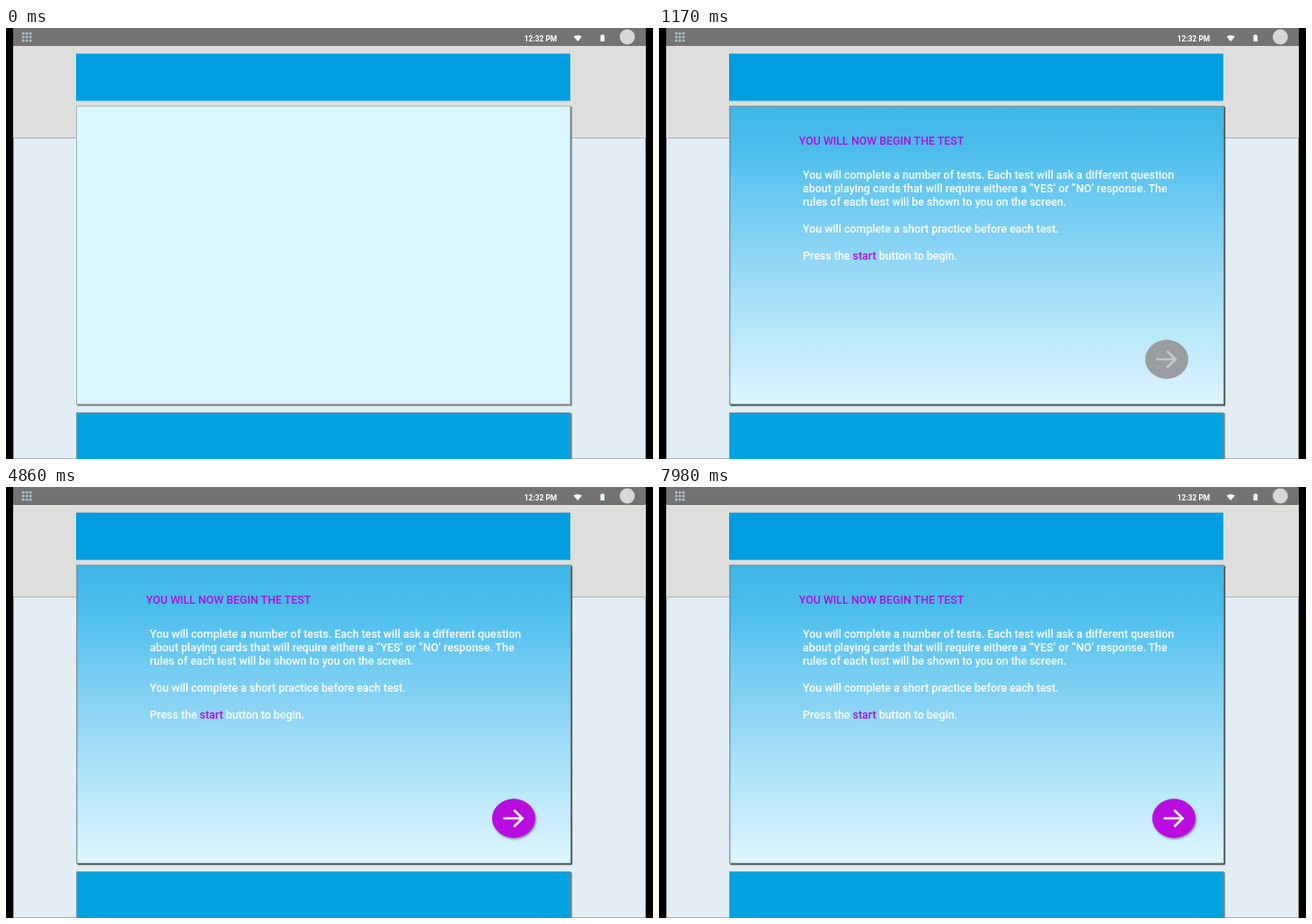
Animation, 720 px wide and 480 px high, one loop 8000 ms. Source, as an HTML page:

```html
<!DOCTYPE html>
<html lang="en">
<head>
<meta charset="utf-8">
<title>Test introduction</title>
<style>
  html, body { margin: 0; width: 100%; height: 100%; overflow: hidden; background: #000; }
  svg { display: block; width: 100%; height: 100%; }
  text { font-family: Roboto, Arial, sans-serif; font-weight: 500; font-size: 12.42px; fill: #fff; }
  .accent { fill: #b20be0; }
  .clock { font-size: 8.4px; font-weight: 700; }
  .arrow { fill: none; stroke: #fff; stroke-width: 2.6; }
</style>
</head>
<body>
<svg viewBox="0 0 720 480">
  <defs>
    <linearGradient id="sky" x1="0" y1="0" x2="0" y2="1">
      <stop offset="0" stop-color="#40b7e8"/>
      <stop offset=".12" stop-color="#48bbea"/>
      <stop offset=".24" stop-color="#5ec5f0"/>
      <stop offset=".42" stop-color="#80d0f2"/>
      <stop offset=".6" stop-color="#a0dcf8"/>
      <stop offset=".75" stop-color="#b6e8f7"/>
      <stop offset=".87" stop-color="#cbecfd"/>
      <stop offset="1" stop-color="#def8ff"/>
    </linearGradient>
    <filter id="shadow" x="-20%" y="-20%" width="150%" height="150%">
      <feDropShadow dx="1" dy="1.5" stdDeviation="1" flood-color="#444" flood-opacity=".6"/>
    </filter>
    <filter id="edge" x="-2%" y="-4%" width="104%" height="108%">
      <feDropShadow dx="1.2" dy="1.2" stdDeviation=".6" flood-color="#333" flood-opacity=".8"/>
    </filter>
  </defs>

  <rect x="8" width="704" height="480" fill="#dededd"/>
  <rect x="8.5" y="122.5" width="703" height="357" fill="#e2edf4" stroke="#aeb3b6"/>

  <rect x="8" width="704" height="20" fill="#737373"/>
  <g id="dots" fill="#a9bec4"></g>
  <text class="clock" x="576.8" y="14.6">12:32 PM</text>
  <path d="M631.5 9.6Q636.3 6.2 641 9.6L636.3 15Z" fill="#eef8fa"/>
  <path d="M661.5 8h1.3v-.8h2v.8h1.3v7h-4.6z" fill="#e6f5fa"/>
  <circle cx="691.4" cy="10" r="8.4" fill="#d8d6d6"/>

  <rect x="78" y="28.5" width="550" height="52.5" fill="#009ee1"/>
  <path d="M78 28.5H628M78 81.3H628" stroke="#8dbdd2" stroke-width=".7"/>
  <rect x="78.5" y="87" width="549.5" height="332" fill="#daf7ff" stroke="#96a3a8" stroke-width=".8" filter="url(#edge)"/>
  <rect x="78.5" y="428.5" width="549.5" height="54" fill="#00a3e0" stroke="#7796a3" stroke-width=".8" filter="url(#edge)"/>

  <g id="panel">
    <rect x="79" y="87.3" width="549.5" height="331.7" fill="url(#sky)" stroke="#71858f" stroke-width=".8" filter="url(#edge)"/>
    <text class="accent" x="155.8" y="130">YOU WILL NOW BEGIN THE TEST</text>
    <text x="160" y="168">You will complete a number of tests. Each test will ask a different question</text>
    <text x="160" y="183">about playing cards that will require eithere a “YES’ or “NO’ response. The</text>
    <text x="160" y="198">rules of each test will be shown to you on the screen.</text>
    <text x="160" y="228">You will complete a short practice before each test.</text>
    <text x="160" y="258">Press the <tspan class="accent">start</tspan> button to begin.</text>
  </g>

  <g id="button">
    <ellipse cx="565" cy="369" rx="24" ry="21.7" fill="#999da0"/>
    <path class="arrow" d="M553.5 369H575M565.3 359.8L574.8 369L565.3 378.2" style="stroke:#c3c7c9"/>
    <g id="active">
      <ellipse cx="565" cy="369" rx="24" ry="21.7" fill="#b90de0" filter="url(#shadow)"/>
      <path class="arrow" d="M553.5 369H575M565.3 359.8L574.8 369L565.3 378.2"/>
    </g>
  </g>
</svg>
<script>
const LOOP = 8000;
const byId = id => document.getElementById(id);

for (let i = 0; i < 9; i++) {
  const dot = document.createElementNS("http://www.w3.org/2000/svg", "circle");
  dot.setAttribute("cx", 19.2 + (i % 3) * 4);
  dot.setAttribute("cy", 6 + Math.floor(i / 3) * 4);
  dot.setAttribute("r", 1.6);
  byId("dots").append(dot);
}

// Each step is [time in ms, value]; values between steps are linear.
function play(id, property, steps, format) {
  const last = steps[steps.length - 1][1];
  const frames = [...steps, [LOOP, last]].map(([time, value]) =>
    ({ offset: time / LOOP, [property]: format(value) }));
  const motion = byId(id).animate(frames, { duration: LOOP, iterations: Infinity });
  motion.startTime = document.timeline.currentTime;
}

const shift = ([x, y]) => `translate(${x}px, ${y}px)`;

play("panel", "transform", [[0, [0, 497.6]], [868, [0, 0]]], shift);
play("button", "transform",
  [[0, [0, 193.8]], [1140, [0, 0]], [5500, [0, 0]], [7980, [8, 0]]], shift);
play("active", "opacity", [[0, 0], [2850, 0], [3870, 1]], String);
</script>
</body>
</html>
```
